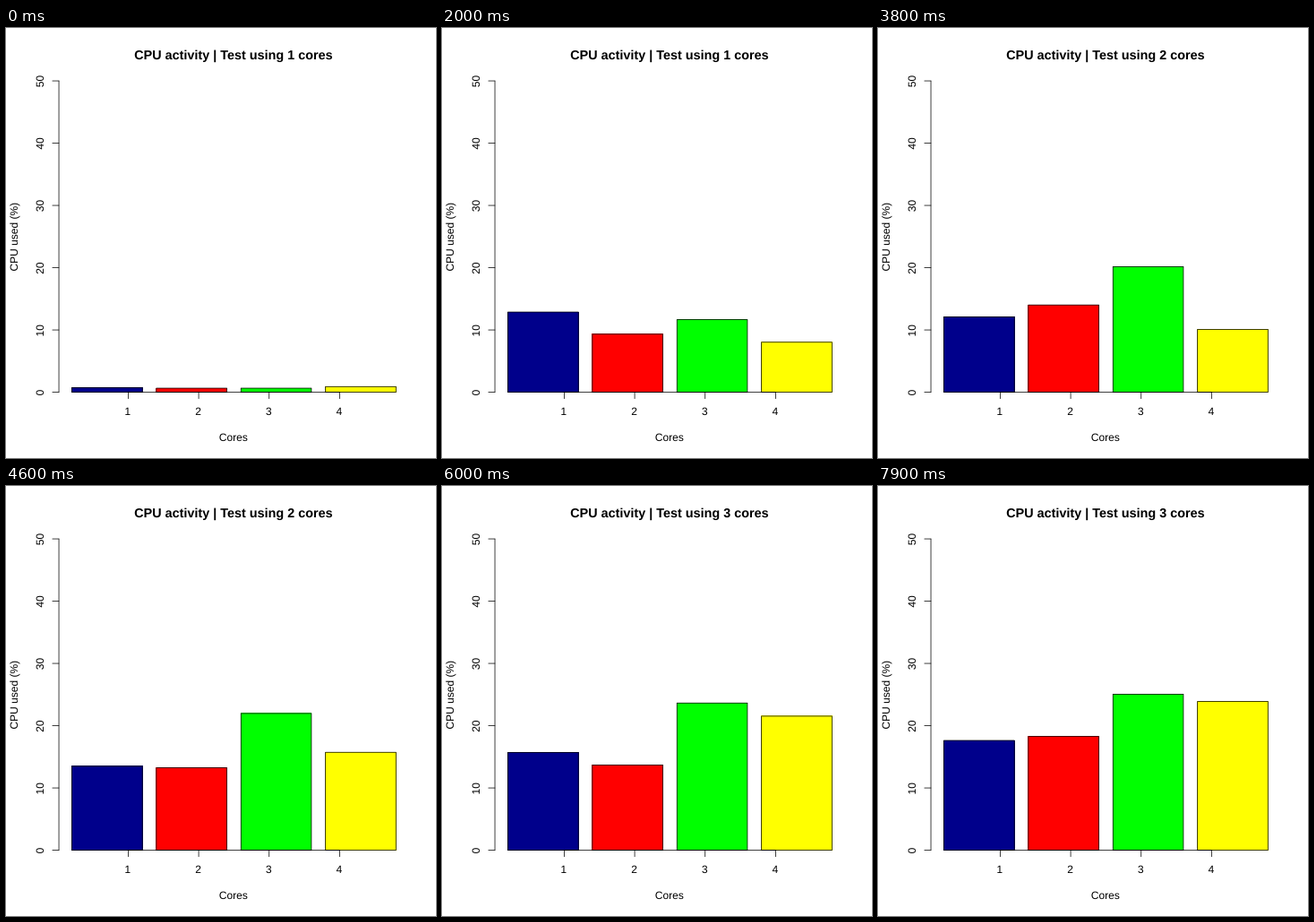
A matplotlib script that plays this animation: 480x480 px, repeating every 8 s.

```python
import numpy as np
import matplotlib.pyplot as plt
from matplotlib.animation import FuncAnimation
from matplotlib.patches import PathPatch, Rectangle
from matplotlib.textpath import TextPath
from matplotlib.transforms import Affine2D

SIZE, DPI, STEP, FRAMES = 480, 72, 100, 80
LEFT, RIGHT, TOP, BOTTOM = 59.04, 449.76, 59.04, 406.56
MIDDLE = (LEFT + RIGHT) / 2
LINE = 14.4   # height of one margin line
TICK = 7.2
LW = 0.75
TEST_FRAMES = 30

# Load of each core in successive phases; the bars show its running mean.
PHASES = [1, 9, 11, 18, 16, 13, 12]
CORES = {
    "#00008b": [0.75, 2.1, 22.8, 11.2, 20.2, 27.2, 21.8],
    "#ff0000": [0.65, 7.6, 11.5, 19.5, 9.4, 23.0, 38.7],
    "#00ff00": [0.65, 12.7, 11.8, 30.1, 30.7, 27.4, 30.9],
    "#ffff00": [0.9, 10.2, 6.9, 12.5, 43.2, 38.1, 27.6],
}
samples = np.repeat(list(CORES.values()), PHASES, axis=1)
means = np.cumsum(samples, axis=1) / np.arange(1, FRAMES + 1)


def px(u):
    return LEFT + (u - 0.016) * (RIGHT - LEFT) / 4.968


def py(v):
    return BOTTOM - v * (BOTTOM - TOP) / 50


fig = plt.figure(figsize=(SIZE / DPI, SIZE / DPI), dpi=DPI, facecolor="white")
ax = fig.add_axes([0, 0, 1, 1])
ax.set_xlim(0, SIZE)
ax.set_ylim(SIZE, 0)
ax.axis("off")


def line(xs, ys):
    ax.plot(xs, ys, color="black", lw=LW, snap=False,
            solid_capstyle="round", zorder=3)


def text_path(x, y, text, size=12, angle=0, weight="normal"):
    """Outline of a text centred on x, y with its baseline through the point."""
    path = TextPath((0, 0), text, size=size,
                    prop={"family": "Liberation Sans", "weight": weight})
    box = path.get_extents()
    place = Affine2D().translate(-box.x0 - box.width / 2 - 0.5, 0)
    place.scale(1, -1).rotate_deg(-angle).translate(x, y)
    return path.transformed(place)


def label(*args, **kwargs):
    patch = PathPatch(text_path(*args, **kwargs), fc="black", lw=0, snap=False)
    return ax.add_patch(patch)


def add_bar(i, **style):
    bar = Rectangle((px(0.2 + 1.2 * i), BOTTOM), px(1) - px(0), 0,
                    snap=False, **style)
    return ax.add_patch(bar)


# Hard-edged fills under smooth outlines
fills = [add_bar(i, fc=c, lw=0, antialiased=False) for i, c in enumerate(CORES)]
frames = [add_bar(i, fc="none", ec="black", lw=LW, joinstyle="round")
          for i in range(len(CORES))]

line([px(1), px(4)], [BOTTOM, BOTTOM])
for n in range(1, 5):
    line([px(n), px(n)], [BOTTOM, BOTTOM + TICK])
    label(px(n), round(BOTTOM + 1.8 * LINE), str(n))

line([LEFT, LEFT], [BOTTOM, TOP])
for v in range(0, 51, 10):
    line([LEFT - TICK, LEFT], [py(v), py(v)])
    label(round(LEFT - 1.2 * LINE), py(v), str(v), angle=90)

label(MIDDLE, round(BOTTOM + 3.8 * LINE), "Cores")
label(round(LEFT - 3.2 * LINE), (TOP + BOTTOM) / 2, "CPU used (%)", angle=90)


def title_path(cores):
    return text_path(MIDDLE, 35, f"CPU activity | Test using {cores} cores",
                     size=LINE, weight="bold")


title = ax.add_patch(PathPatch(title_path(1), fc="black", lw=0, snap=False))


def update(frame):
    for fill, edge, mean in zip(fills, frames, means[:, frame]):
        for bar in (fill, edge):
            bar.set_y(py(mean))
            bar.set_height(BOTTOM - py(mean))
    title.set_path(title_path(1 + frame // TEST_FRAMES))
    return [*fills, *frames, title]


anim = FuncAnimation(fig, update, frames=FRAMES, interval=STEP,
                     repeat=True, repeat_delay=0, blit=False)
plt.show()
```
